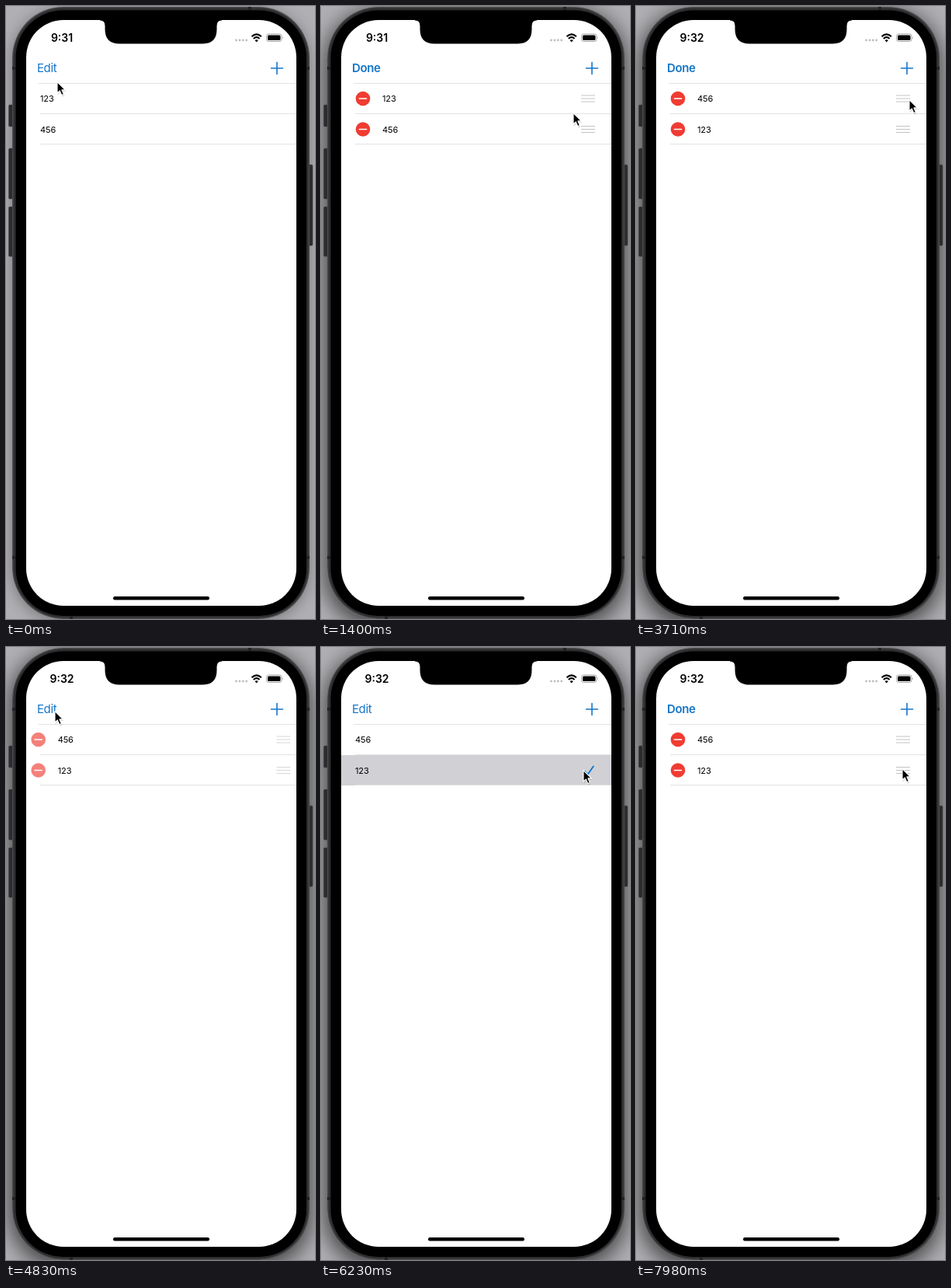
Recreate the animation shown at these times as an HTML page. Size 398 by 788 pixels, loop 8000 ms.

```html
<!DOCTYPE html>
<html lang="en">
<head>
<meta charset="utf-8">
<title>List editing</title>
<style>
html, body { margin: 0; width: 100%; height: 100%; overflow: hidden; }
body { position: relative; background: #b0b0b4; }
#shade {
  position: absolute; left: 8px; top: 1px; width: 382px; height: 787px; border-radius: 66px;
  box-shadow: 0 3px 18px 1px rgba(0, 0, 0, .3);
}
#shade.active { box-shadow: 0 7px 26px 4px rgba(0, 0, 0, .6); }
svg { position: absolute; left: 0; top: 0; display: block; }
text { font-family: Inter, Roboto, sans-serif; }
.nav { font-size: 15px; letter-spacing: -.4px; fill: #1475c8; }
.label { font-size: 11px; letter-spacing: -.1px; }
.blue { fill: none; stroke: #1475c8; stroke-width: 1.6; stroke-linecap: round; stroke-linejoin: round; }
.line { stroke: #e2e2e4; }
</style>
</head>
<body>
<div id="shade"></div>
<svg width="398" height="788" viewBox="0 0 398 788">
  <defs>
    <clipPath id="screen"><rect x="26" y="18" width="348" height="753" rx="48"/></clipPath>
    <g id="minus">
      <circle cx="54" r="9.3" fill="#f03c32"/>
      <path d="M49.5 0h9" stroke="#fff" stroke-width="1.7" stroke-linecap="round"/>
    </g>
    <path id="grip" d="M335 -4h18M335 0h18M335 4h18" stroke="#c3c3c5" stroke-width="1.2"/>
  </defs>

  <!-- device -->
  <g fill="#2b2c2e" stroke="#4b4c4f" stroke-width=".6">
    <rect x="3.5" y="127" width="6" height="28" rx="1.5"/>
    <rect x="3.5" y="183" width="6" height="65" rx="1.5"/>
    <rect x="3.5" y="258" width="6" height="64" rx="1.5"/>
    <rect x="389" y="204" width="6" height="104" rx="1.5"/>
  </g>
  <rect x="8" y="1" width="383" height="787" rx="66" fill="#4a4a4c"/>
  <rect x="9.5" y="2.5" width="380" height="784" rx="64.5" fill="#2e2e30"/>
  <g fill="#232325">
    <rect x="8" y="78" width="5" height="4"/><rect x="386" y="78" width="5" height="4"/>
    <rect x="8" y="707" width="5" height="4"/><rect x="386" y="707" width="5" height="4"/>
    <rect x="312" y="1" width="4" height="5"/><rect x="82" y="783" width="4" height="5"/>
  </g>
  <rect x="12.5" y="5.5" width="374.5" height="778.5" rx="61"/>
  <rect x="26" y="18" width="348" height="753" rx="48" fill="#fff"/>
  <path d="M121 17.5v1q6.500 0 6.500 7v4.500q0 18.500 18.500 18.500h107q18.500 0 18.500-18.500v-4.500q0-7 6.500-7v-1z"/>
  <rect x="138" y="759" width="124" height="4.500" rx="2.250"/>

  <!-- status bar -->
  <text id="clock" x="72" y="45.700" font-size="14" font-weight="600" text-anchor="middle">9:31</text>
  <g fill="#bdbdbf">
    <circle cx="296.500" cy="44" r="1.400"/><circle cx="301" cy="44" r="1.400"/>
    <circle cx="305.300" cy="44" r="1.400"/><circle cx="309.700" cy="44" r="1.400"/>
  </g>
  <g fill="none" stroke="#000" stroke-width="2">
    <path d="M316.500 39.200q6.200-5.600 12.400 0M318.800 41.900q3.900-3.500 7.800 0"/>
  </g>
  <path d="M322.700 46.400l-2.200-2.300q2.200-1.800 4.400 0z"/>
  <rect x="335.500" y="36" width="19.500" height="9.500" rx="2.800" fill="none" stroke="#9a9a9c" stroke-width=".9"/>
  <rect x="337" y="37.500" width="16.500" height="6.500" rx="1.500"/>
  <path d="M356 39.300q1.500 1.500 0 3z" fill="#9a9a9c"/>

  <g clip-path="url(#screen)">
    <text id="nav" class="nav" x="40" y="85.300">Edit</text>
    <path class="blue" d="M341.500 80h15M349 72.500v15"/>
    <rect id="glow" x="26" y="139" width="348" height="39" fill="#d1d1d5"/>
    <g id="rules" class="line"><path d="M44 138.500h330M44 177.500h330"/></g>
    <g id="rowA">
      <use href="#minus" class="del"/>
      <text class="label" y="4">123</text>
      <use href="#grip" class="drag"/>
    </g>
    <g id="rowB">
      <rect id="plate" x="26" y="-19" width="348" height="38" fill="#fff"/>
      <use href="#minus" class="del"/>
      <text class="label" y="4">456</text>
      <use href="#grip" class="drag"/>
    </g>
    <path class="line" d="M42 99.500h332"/>
    <path id="check" class="blue" style="stroke-width:1.900" d="M339.800 159.700l3.700 4.300l7.300-10.500"/>
  </g>

  <g id="pointer">
    <circle id="ring" r="21.300" fill="none" stroke="#000" stroke-width="1.500"/>
    <path d="M.5 1v15.500l3.500-3.300l2.600 5.600l2.900-1.300l-2.500-5.400h4.700z" fill="#000" opacity=".13"/>
    <path d="M0 -.5v14.500l3.300-3.100l2.500 5.700l2.600-1.200l-2.500-5.500h4.500z" stroke="#fff" stroke-width="1.100" stroke-linejoin="round"/>
  </g>
</svg>
<script>
const LOOP = 8000, STEP = 70;
const $ = id => document.getElementById(id);
const all = (sel, fn) => document.querySelectorAll(sel).forEach(fn);
const ramp = (t, a, b) => {
  const u = Math.min(1, Math.max(0, (t - a) / (b - a)));
  return u * u * (3 - 2 * u);
};
const mix = (a, b, u) => a + (b - a) * u;
const within = (t, a, b) => t >= a && t < b;

// pointer path: time, x, y
const path = [
  [0, 66, 98], [280, 60, 84], [980, 60, 84], [1400, 325, 138], [1610, 337, 164],
  [1820, 337, 154], [2100, 363, 157], [2170, 363, 157], [2380, 353, 159.5], [2590, 353, 159],
  [2870, 351, 156], [3010, 351, 153.5], [3430, 352, 121], [4060, 352, 121], [4550, 63, 83],
  [4970, 63, 83], [5320, 190, 228], [5530, 205, 224], [5880, 338, 159], [6230, 338, 159],
  [6720, 65, 72], [6860, 65, 72], [6930, 65, 75], [7140, 65, 75], [7700, 324, 157], [7980, 343, 157]
];
const presses = [[280, 420], [2450, 3500], [4620, 4760], [6020, 6160], [6930, 7070]];

function pointerAt(t) {
  const i = path.findIndex(p => p[0] > t);
  if (i < 0) return path[path.length - 1].slice(1);
  const [a, b] = [path[i - 1], path[i]], u = ramp(t, a[0], b[0]);
  return [mix(a[1], b[1], u), mix(a[2], b[2], u)];
}

function draw(t) {
  const [x, y] = pointerAt(t);
  const pressed = presses.some(([a, b]) => within(t, a, b));
  const edit = ramp(t, 350, 700) - ramp(t, 4690, 5040) + ramp(t, 7000, 7350);
  const editing = within(t, 420, 4760) || t >= 7070;

  $('shade').className = t >= 280 ? 'active' : '';
  $('clock').textContent = t < 1610 ? '9:31' : '9:32';
  $('nav').textContent = editing ? 'Done' : 'Edit';
  $('nav').style.fontWeight = editing ? 600 : 400;
  $('nav').style.opacity = pressed && y < 95 ? .35 : 1;

  $('pointer').setAttribute('transform', `translate(${x} ${y})`);
  $('ring').style.opacity = pressed ? 1 : 0;

  // rows
  const held = within(t, 2520, 3500);
  let rowB = 158.5;
  if (held) rowB = Math.min(158.5, y);
  else if (t >= 3500) rowB = mix(121, 119, ramp(t, 3430, 3640));
  $('rowA').setAttribute('transform', `translate(0 ${mix(119, 158.5, ramp(t, 3150, 3430))})`);
  $('rowB').setAttribute('transform', `translate(0 ${rowB})`);
  $('plate').style.opacity = held ? .85 : 0;
  $('rules').style.opacity = 1 - ramp(t, 2450, 2660) + ramp(t, 3430, 3640);

  all('.label', el => el.setAttribute('x', 44 + 35 * edit));
  all('.del', el => {
    el.setAttribute('x', -35 * (1 - edit));
    el.style.opacity = edit;
  });
  all('.drag', el => {
    el.setAttribute('x', 38 * (1 - edit));
    el.style.opacity = edit;
  });

  $('glow').style.opacity = t < 6160 ? 0 : 1 - ramp(t, 6230, 6580);
  $('check').style.opacity = t < 6230 ? 0 : 1 - ramp(t, 7000, 7210);
}

const start = performance.now();
function tick(now) {
  const t = Math.max(0, now - start) % LOOP;
  draw(Math.floor(t / STEP) * STEP);
  requestAnimationFrame(tick);
}
draw(0);
requestAnimationFrame(tick);
</script>
</body>
</html>
```
